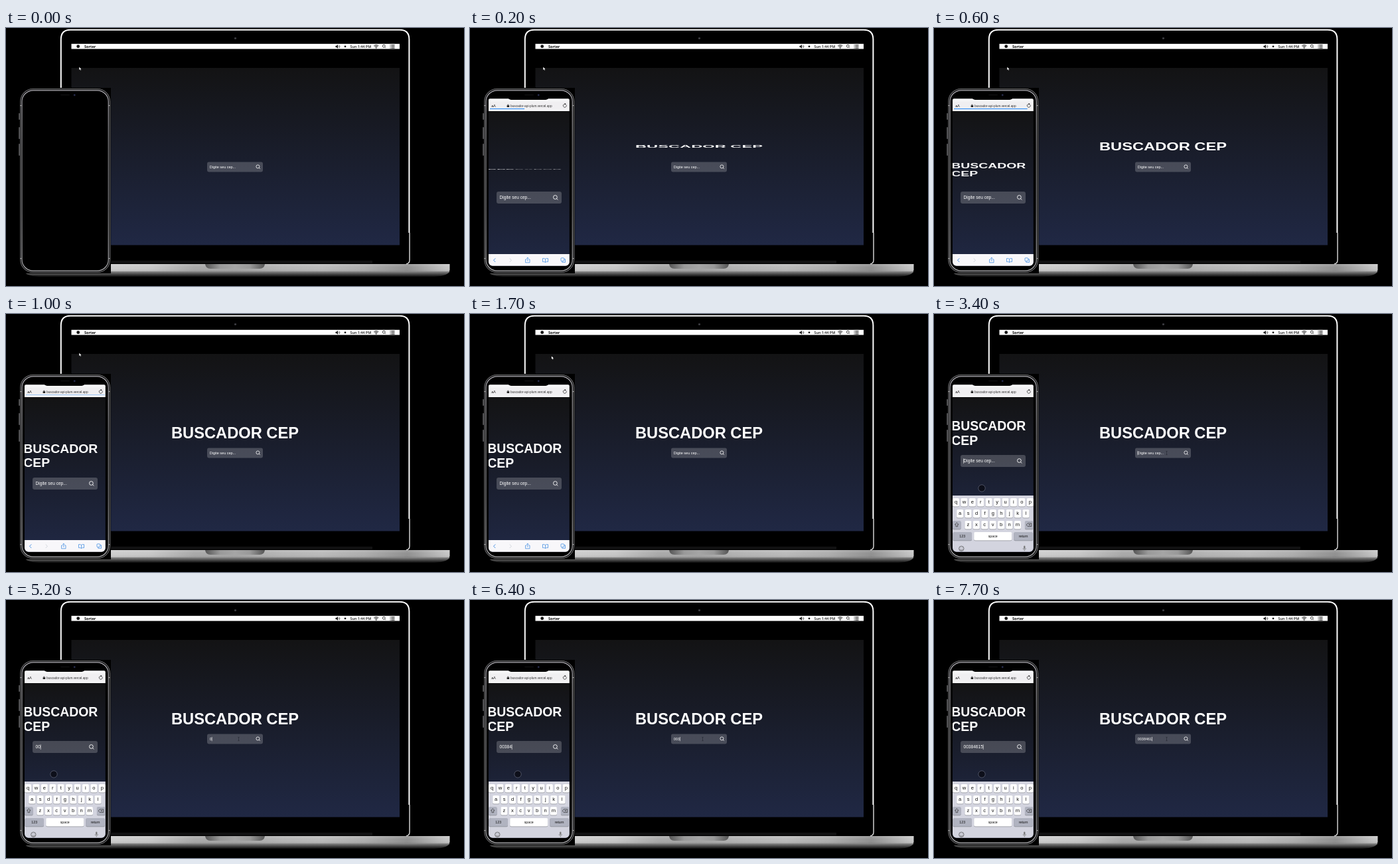
Recreate the animation shown at these times as an HTML page with a canvas. Size 690 by 388 pixels, loop 8 s.

```html
<!DOCTYPE html>
<html lang="pt-BR">
<head>
<meta charset="utf-8">
<title>Buscador CEP</title>
<style>
html, body { margin: 0; width: 100%; height: 100%; overflow: hidden; background: #000; }
canvas { display: block; width: 690px; height: 388px; }
</style>
</head>
<body>
<canvas id="stage"></canvas>
<script>
const W = 690, H = 388, LOOP = 8000;
const canvas = document.getElementById('stage');
const ctx = canvas.getContext('2d');
const dpr = window.devicePixelRatio || 1;
canvas.width = W * dpr;
canvas.height = H * dpr;

const SANS = '"Liberation Sans", Arial, sans-serif';
const MENU = '"Open Sans", "Noto Sans", sans-serif';
const CODE = '00384615';
const HINT = 'Digite seu cep...';
const PHONE_KEYS = [4400, 4700, 5500, 6000, 6300, 6900, 7200, 7400];
const LAPTOP_KEYS = [5200, 5500, 6300, 6600, 6900, 7400, 7700];

const clamp = x => Math.max(0, Math.min(1, x));
const lerp = (a, b, p) => a + (b - a) * p;
const span = (t, from, to) => clamp((t - from) / (to - from));
const ease = p => p * p * (3 - 2 * p);
const easeOut = p => 1 - (1 - p) ** 3;
const typed = (keys, t) => CODE.slice(0, keys.filter(k => k <= t).length);

function rect(x, y, w, h, color) {
  ctx.fillStyle = color;
  ctx.fillRect(x, y, w, h);
}
function box(x, y, w, h, r) {
  ctx.beginPath();
  ctx.roundRect(x, y, w, h, r);
}
function fillBox(x, y, w, h, r, color) {
  box(x, y, w, h, r);
  ctx.fillStyle = color;
  ctx.fill();
}
function strokeBox(x, y, w, h, r, color, width) {
  box(x, y, w, h, r);
  ctx.strokeStyle = color;
  ctx.lineWidth = width;
  ctx.stroke();
}
function dot(x, y, r, color) {
  ctx.beginPath();
  ctx.arc(x, y, r, 0, 7);
  ctx.fillStyle = color;
  ctx.fill();
}
function arc(x, y, r, a, b, color, width) {
  ctx.beginPath();
  ctx.arc(x, y, r, a, b);
  ctx.strokeStyle = color;
  ctx.lineWidth = width;
  ctx.stroke();
}
function path(d, color, width) {
  const p = new Path2D(d);
  if (width) {
    ctx.strokeStyle = color;
    ctx.lineWidth = width;
    ctx.stroke(p);
  } else {
    ctx.fillStyle = color;
    ctx.fill(p);
  }
}
function text(str, x, y, font, color, align = 'left') {
  ctx.font = font;
  ctx.fillStyle = color;
  ctx.textAlign = align;
  ctx.fillText(str, x, y);
}
function gradient(x0, y0, x1, y1, ...colors) {
  const g = ctx.createLinearGradient(x0, y0, x1, y1);
  colors.forEach((c, i) => g.addColorStop(i / (colors.length - 1), c));
  return g;
}
const night = (y0, y1) => gradient(0, y0, 0, y1, '#131314', '#202844');

function lens(x, y, r, color, width) {
  arc(x, y, r, 0, 7, color, width);
  path(`M${x + r * .7} ${y + r * .7}l${r * .65} ${r * .65}`, color, width);
}

// Draws its content squashed about a horizontal axis, as a flip in from edge-on.
function flip(y, angle, draw) {
  const s = Math.sin(angle * Math.PI / 2);
  if (s <= 0) return;
  ctx.save();
  ctx.translate(0, y);
  ctx.scale(1, s);
  draw();
  ctx.restore();
}

function field(x, y, w, h, size, value, caret) {
  fillBox(x, y, w, h, size * .45, 'rgba(255,255,255,.2)');
  const tx = x + size * .68, base = y + h / 2 + size * .36;
  text(value || HINT, tx, base, `${size}px ${SANS}`, '#fff');
  if (caret) {
    const cx = tx + (value ? ctx.measureText(value).width : 0);
    rect(cx, base - size * .92, .6, size * 1.15, '#fff');
  }
}

function menuBar() {
  rect(98.5, 23.8, 494.5, 7.7, '#fff');
  dot(108.7, 27.7, 2.4, '#111');
  text('Sorter', 118, 29.7, `bold 5.6px ${MENU}`, '#000');
  path('M496.5 26.8h1.4l2-1.7v5.6l-2-1.7h-1.4z', '#111');
  arc(500, 27.9, 1.5, -1, 1, '#111', .6);
  arc(500, 27.9, 2.9, -.9, .9, '#111', .6);
  dot(511, 27.8, 1.4, '#111');
  text('Sun 1:44 PM', 518.5, 29.7, `600 5.4px ${MENU}`, '#111');
  for (const r of [1.6, 3.3, 5]) arc(557.7, 30.6, r, -2.36, -.78, '#111', .9);
  dot(557.7, 30.1, .7, '#111');
  lens(569.3, 27.2, 1.9, '#111', .8);
  for (let i = 0; i < 3; i++) {
    rect(578.5, 25.3 + i * 2.2, 1, 1, '#111');
    rect(580.3, 25.3 + i * 2.2, 5.2, 1, '#111');
  }
}

function laptopBody() {
  path('M82.8 356V17Q82.8 2.7 97 2.7H593Q607.4 2.7 607.4 17V308', '#fff', 2);
  path('M608 308V349Q608 354 603 355', '#ddd', 1.4);
  dot(345.5, 15.5, 1.8, '#2b2b2e');
  dot(345.5, 15.5, .8, '#50505a');
  rect(158, 349.8, 394, 4, '#121213');

  box(27, 355, 641.5, 11.5, [0, 0, 3, 0]);
  ctx.fillStyle = gradient(27, 0, 669, 0, '#777', '#aaa', '#cdcdcd', '#c6c6c6', '#a8a8a8',
    '#a6a6a6', '#b4b4b4', '#bababa', '#adadad', '#909090', '#c8c8c8');
  ctx.fill();
  fillBox(27, 355, 641.5, 11.5, [0, 0, 3, 0],
    gradient(0, 355, 0, 366.5, 'rgba(255,255,255,.15)', 'rgba(255,255,255,0)', 'rgba(0,0,0,.12)'));
  path('M27 366H668.5Q664 374 640 374H56Q31 374 27 366Z',
    gradient(0, 366, 0, 374, '#8c8c8c', '#4a4a4a', '#0c0c0c'));
  path('M300 355H390Q389 362 382 362H308Q301 362 300 355Z',
    gradient(300, 0, 390, 0, '#555', '#999', '#a5a5a5', '#999', '#555'));
}

function pointer(t) {
  const a = ease(span(t, 1600, 2350)), b = ease(span(t, 2350, 3150));
  const x = lerp(lerp(110.3, 364, a), 350.5, b);
  const y = lerp(lerp(58.8, 154.8, a), 209, b);
  if (t >= 3100) {
    path(`M${x - 1.2} ${y - 2.6}h2.4M${x} ${y - 2.6}v5.2M${x - 1.2} ${y + 2.6}h2.4`, '#23252f', .6);
  } else {
    path(`M${x} ${y}v4.2l1-.9.8 1.6.8-.4-.8-1.5h1.4z`, '#fff');
  }
}

function laptop(t) {
  laptopBody();
  menuBar();
  ctx.fillStyle = night(60, 326.5);
  ctx.fillRect(98.5, 60, 494.5, 266.5);
  flip(178.2, span(t, 70, 1100), () =>
    text('BUSCADOR CEP', 345, 8.4, `bold 23.7px ${SANS}`, '#fff', 'center'));
  const caret = t >= 3400 && (t < 4100 || t >= 4700);
  field(303, 201.5, 84, 15, 5.5, typed(LAPTOP_KEYS, t), caret);
  lens(379.4, 208.4, 2.5, '#fff', .8);
  pointer(t);
}

function addressBar(t) {
  rect(27, 106, 123, 19, '#f6f6f7');
  fillBox(30.5, 110.5, 117, 12, 3, '#f0eff1');
  text('A', 32.3, 118.8, `4.4px ${SANS}`, '#222');
  text('A', 35, 118.8, `5.6px ${SANS}`, '#222');
  fillBox(55.6, 116.3, 3.6, 2.8, .5, '#222');
  arc(57.4, 116.2, 1.1, Math.PI, 0, '#222', .6);
  text('buscador-api-plum.vercel.app', 61, 118.6, `4.75px ${SANS}`, '#333');
  arc(142.8, 116.8, 2.5, -.5, 4.9, '#222', .7);
  path('M142.7 113l2.2 1.3-2.2 1.4z', '#222');
  if (t < 1250) {
    const load = lerp(40, 149, easeOut(span(t, 60, 1000)));
    ctx.globalAlpha = 1 - .6 * span(t, 700, 1000) - .4 * span(t, 1000, 1250);
    rect(30, 121, load - 30, 1.1, '#2f8df5');
    ctx.globalAlpha = 1;
  }
}

function toolbar(y) {
  const blue = '#3f8be0';
  rect(27, y, 123, 19, '#f8f7fa');
  ctx.save();
  ctx.translate(0, y + 9.2);
  path('M38.3 -2.8l-2.8 2.8 2.8 2.8', blue, .9);
  path('M59.7 -2.8l2.8 2.8-2.8 2.8', '#cfd3da', .9);
  path('M85.3 -1.2h-1.7v4.8h6.4v-4.8h-1.7M86.8 1.4v-5.4M85.2 -2.5l1.6-1.6 1.6 1.6', blue, .75);
  path('M113.5 -1.8q-1.8-1.4-4-.8v5q2.2-.5 4 .8q1.8-1.3 4-.8v-5q-2.2-.6-4 .8v5', blue, .75);
  strokeBox(137, -3.4, 4.7, 4.7, .8, blue, .75);
  path('M138.8 1.6v1.6h4.7v-4.7h-1.6', blue, .75);
  ctx.restore();
}

function key(x, y, w, label, color, size) {
  fillBox(x - w / 2, y - 6 + .7, w, 12.6, 1.8, '#8e9098');
  fillBox(x - w / 2, y - 6, w, 12.5, 1.8, color);
  text(label, x, y + size * .3, `${size}px ${SANS}`, '#111', 'center');
}

function keyboard(y) {
  const gray = '#b0b3c0';
  rect(27, y, 123, 90, '#d3d4df');
  ctx.save();
  ctx.translate(0, y);
  const row = (letters, x, ky) =>
    [...letters].forEach((c, i) => key(x + i * 12.42, ky, 10, c, '#fff', 7.6));
  row('qwertyuiop', 33, 10);
  row('asdfghjkl', 39.2, 27);
  row('zxcvbnm', 51.4, 44);
  key(34.3, 44, 12.5, '', gray, 6);
  key(143.2, 44, 12.5, '', gray, 6);
  path('M34.3 40.6l-2.7 3.1h1.4v3h2.6v-3h1.4z', '#222', .6);
  path('M141.3 41.7h5.4v4.8h-5.4l-2.2-2.4zM142.6 42.9l2.4 2.4m0-2.4l-2.4 2.4', '#222', .6);
  key(42.7, 61, 28.5, '123', gray, 5.3);
  key(88.7, 61, 57, 'space', '#fff', 5.3);
  key(134.6, 61, 28.5, 'return', gray, 5.3);
  arc(41.3, 79.8, 3.7, 0, 7, '#444', .7);
  arc(41.3, 80.2, 2, .2, 2.94, '#444', .6);
  dot(40, 78.8, .45, '#444');
  dot(42.6, 78.8, .45, '#444');
  fillBox(135.2, 75.4, 2.2, 5, 1.1, '#777');
  arc(136.3, 79.2, 2.3, 0, Math.PI, '#777', .6);
  path('M136.3 81.5v2', '#777', .6);
  ctx.restore();
}

function phoneScreen(t) {
  const bars = ease(span(t, 1900, 2200));
  const keys = ease(span(t, 2800, 3350));
  const shift = 10 * bars - 44 * keys;

  ctx.save();
  box(28, 106.3, 121.8, 251.5, [2, 2, 6, 6]);
  ctx.clip();
  ctx.fillStyle = night(125, 358 + Math.min(0, shift));
  ctx.fillRect(27, 125, 123, 234);

  flip(213 + shift, span(t, 185, 1265), () => {
    const font = `bold 19.4px ${SANS}`;
    text('BUSCADOR', 26.3, -3.8, font, '#fff');
    text('CEP', 26.3, 18.2, font, '#fff');
  });
  const caret = t >= 3300 && (t < 3900 || t >= 4400);
  field(40, 246 + shift, 98, 18, 6.6, typed(PHONE_KEYS, t), caret);
  lens(128.4, 254.5 + shift, 2.9, '#fff', .9);

  ctx.globalAlpha = span(t, 2000, 2200);
  dot(72, 262, 5, 'rgba(10,12,20,.82)');
  arc(72, 262, 5.2, 0, 7, 'rgba(150,155,175,.5)', .8);
  ctx.globalAlpha = 1;

  if (bars < 1) toolbar(lerp(340, 359, bars));
  if (keys > 0) keyboard(lerp(359, 273, keys));
  addressBar(t);
  ctx.restore();
}

function phone(t) {
  rect(20, 90, 138, 279, '#000');
  for (const [y, h] of [[128, 10], [149, 18], [174, 18]]) fillBox(19, y, 2, h, .8, '#4b4b4d');
  strokeBox(21.8, 91.6, 134.8, 275.8, 19, '#69696b', 1.2);
  strokeBox(24, 93.8, 130.3, 271.4, 17,
    gradient(0, 93, 0, 366, '#b5b3ba', '#88888b', '#88888b', '#b5b5b8'), 1.2);
  for (const y of [116, 346]) {
    rect(21, y, 2.6, 1.2, '#999');
    rect(154.4, y, 2.6, 1.2, '#999');
  }
  if (t >= 100) {
    phoneScreen(t);
    fillBox(57, 95, 62, 13, [0, 0, 5, 5], '#000');
  }
  fillBox(82, 99.9, 14, 1.4, .7, '#101012');
  dot(103.2, 100.8, 1.6, '#1b1d33');
  dot(103.2, 100.8, .7, '#3a4070');
}

function draw(t) {
  ctx.setTransform(dpr, 0, 0, dpr, 0, 0);
  rect(0, 0, W, H, '#000');
  laptop(t);
  phone(t);
}

const start = performance.now();
function tick() {
  draw((performance.now() - start) % LOOP);
  requestAnimationFrame(tick);
}
tick();
</script>
</body>
</html>
```
